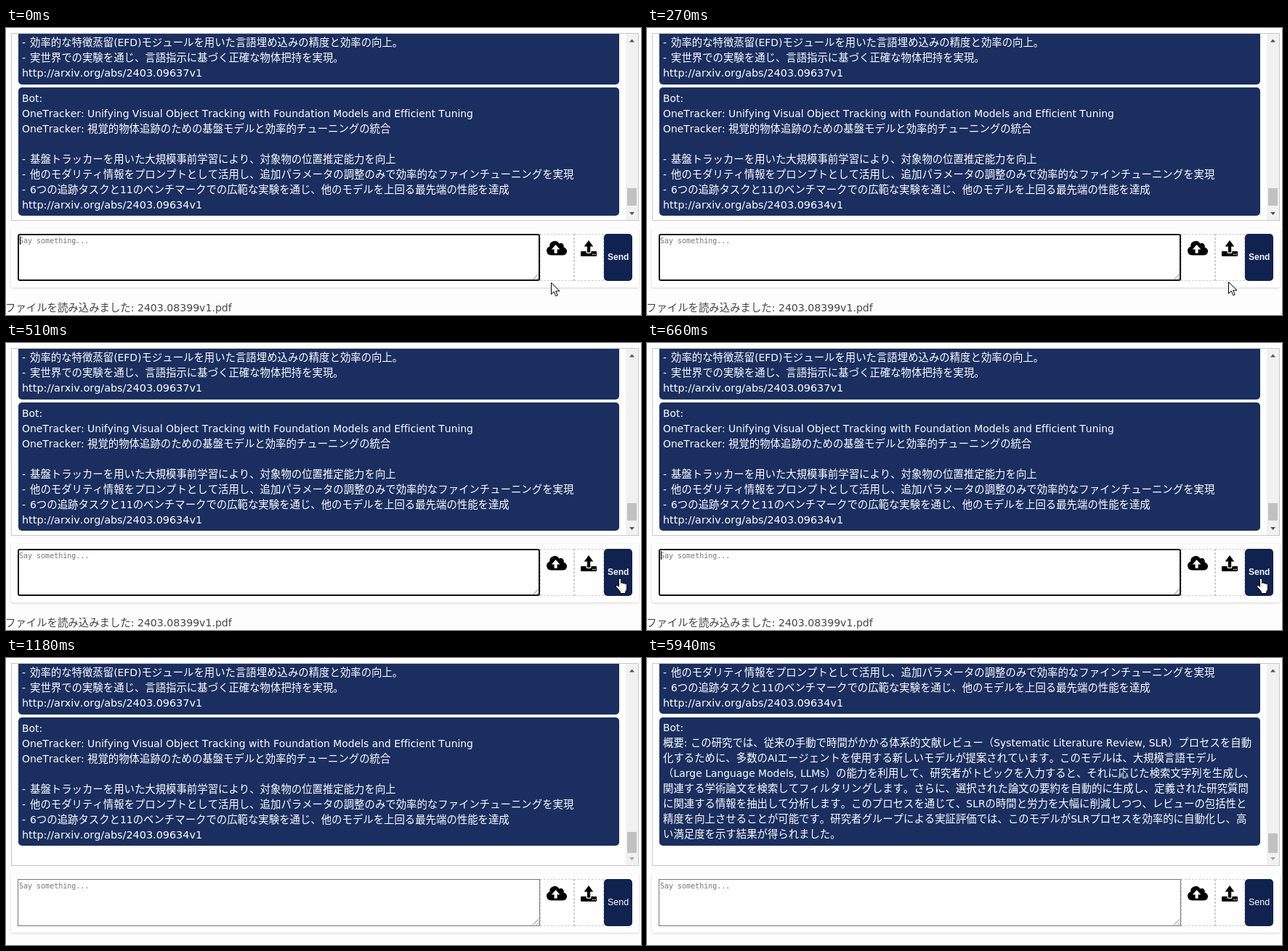
Animation, 874 px wide and 396 px high, one loop 8000 ms. Source, as an HTML page:

```html
<!DOCTYPE html>
<html lang="ja">
<head>
<meta charset="utf-8">
<title>Chat</title>
<style>
  html, body { margin: 0; width: 100%; height: 100%; overflow: hidden; background: #fdfdfd; }
  svg { display: block; width: 874px; height: 396px; }
  text {
    white-space: pre; font: 14.4px "Noto Sans CJK JP", "Noto Sans CJK", sans-serif;
    font-kerning: none; font-variant-ligatures: none; text-spacing-trim: space-all;
  }
  .word, .code { font-family: "DejaVu Sans", sans-serif; }
  .word { font-size: 13.9px; }
  .code { font-size: 14.4px; }
  #status { fill: #444; }
  #status .code { font-size: 14.1px; }
  .messages text { fill: #fff; font-weight: 500; }
  .messages rect { fill: #1a2f5f; }
  #hint { font: 10px "DejaVu Sans Mono", monospace; fill: #757575; }
  #send { font: bold 12px "Liberation Sans", Arial, sans-serif; fill: #f2f2f2; }
  .sent #send { font-weight: normal; font-size: 12.5px; fill: #fff; }
  #panel { fill: #fff; filter: drop-shadow(0 1px 1.5px rgba(0, 0, 0, .16)); }
  .drop { box-sizing: border-box; height: 65px; border: 1px dashed #ccc; }
  .pointer { fill: #fff; stroke: #000; stroke-linejoin: round; }
</style>
</head>
<body>
<svg viewBox="0 0 874 396">
  <clipPath id="view"><rect x="8" y="8" width="845" height="278"/></clipPath>
  <rect id="chat" x="7.5" y="7.5" width="863" fill="#fff" stroke="#c8c8c8"/>
  <g clip-path="url(#view)">
    <g id="before" class="messages"></g>
    <g id="after" class="messages"></g>
  </g>
  <rect id="track" x="853" y="8" width="17" fill="#f1f1f1"/>
  <path d="M858 19.5h7l-3.5-4z" fill="#505050"/>
  <rect id="thumb" x="855" width="13" fill="#c1c1c1"/>
  <path id="down" d="M858 -2h7l-3.5 4z"/>

  <g id="form">
    <rect id="panel" x="7" y="277" width="864" height="81" rx="2"/>
    <rect id="input" fill="#fff"/>
    <path d="M725 347.5l8-8M730 347.5l3-3" stroke="#777" fill="none"/>
    <text id="hint" x="18" y="297">Say something...</text>
    <path id="caret" d="M19.5 287v12" stroke="#000"/>
    <foreignObject x="735" y="284" width="47" height="65"><div class="drop"></div></foreignObject>
    <foreignObject x="782" y="284" width="41" height="65"><div class="drop"></div></foreignObject>
    <g transform="translate(744 294)">
      <path d="M6.3 19.6A6.3 6.3 0 0 1 4.2 7.4 7 7 0 0 1 17.3 3.5 4.2 4.2 0 0 1 23.5 8.5 5.6 5.6 0 0 1 22.4 19.6z"/>
      <path d="M12.6 5.2l5.3 6h-3.5v5.4h-3.6v-5.4H7.3z" fill="#fff" stroke="#fff" stroke-width=".4" stroke-linejoin="round"/>
    </g>
    <g transform="translate(791 293)">
      <rect y="15" width="22" height="7" rx="1.1"/>
      <rect x="7.6" y="13" width="6.8" height="5" rx="1.5" fill="#fff"/>
      <path d="M11 .3l5.8 7.9h-3.9v8.2H9.1V8.2H5.2z" stroke="#000" stroke-width=".5" stroke-linejoin="round"/>
      <path d="M16.2 19.6h1.5m1.4 0h1.5" stroke="#fff" stroke-width="1.5"/>
    </g>
    <rect x="823" y="284" width="39" height="65" rx="5" fill="#10224f"/>
    <text id="send" x="828" y="320">Send</text>
  </g>
  <text id="status" x="-1" y="391"></text>
  <path id="arrow" class="pointer" d="M.5 .5V16.5l3.8-3.7 2.5 6 2.4-1-2.5-5.8H12z"/>
  <path id="hand" class="pointer" d="M5.5 12V2.2a1.5 1.5 0 0 1 3 0V7.5c0-1.2 2.8-1.2 2.8.6 0-1.1 2.7-1 2.7.6 0-1 2.5-.8 2.5 1V15c0 2-1.8 3-1.8 5v1.5H7.5V20C7 17.5 3 14.5 1.5 12c-.6-1.2 1-2.2 2-1.2z"/>
</svg>
<script>
const LOOP = 8000, LINE = 21;
const $ = id => document.getElementById(id);
const set = (id, attrs) => {
  for (const name in attrs) $(id).setAttribute(name, attrs[name]);
};
const show = (id, visible) => { $(id).style.display = visible ? '' : 'none'; };

// Latin runs get their own face; long numbers mark links and file names.
const mixed = text => text.replace(/[ -~]+/g, run =>
  `<tspan class="${/\d{4}/.test(run) ? 'code' : 'word'}">${run}</tspan>`);

function line(text, y) {
  const bullet = text.startsWith('- ');
  const dash = bullet ? `<text x="22" y="${y}" class="word">-</text>` : '';
  return `${dash}<text x="${bullet ? 33 : 22}" y="${y}">${mixed(bullet ? text.slice(2) : text)}</text>`;
}
const lines = (list, y) => list.map((text, i) => line(text, y + i * LINE)).join('');
const bubble = (top, bottom) =>
  `<rect x="17" y="${top}" width="827" height="${bottom - top}" rx="5"/>`;

const grasping = [
  '- 効率的な特徴蒸留(EFD)モジュールを用いた言語埋め込みの精度と効率の向上。',
  '- 実世界での実験を通じ、言語指示に基づく正確な物体把持を実現。',
  'http://arxiv.org/abs/2403.09637v1'
];
const tracking = [
  'OneTracker: Unifying Visual Object Tracking with Foundation Models and Efficient Tuning',
  'OneTracker: 視覚的物体追跡のための基盤モデルと効率的チューニングの統合',
  '',
  '- 基盤トラッカーを用いた大規模事前学習により、対象物の位置推定能力を向上',
  '- 他のモダリティ情報をプロンプトとして活用し、追加パラメータの調整のみで効率的なファインチューニングを実現',
  '- 6つの追跡タスクと11のベンチマークでの広範な実験を通じ、他のモデルを上回る最先端の性能を達成',
  'http://arxiv.org/abs/2403.09634v1'
];
const summary = [
  '概要: この研究では、従来の手動で時間がかかる体系的文献レビュー（Systematic Literature Review, SLR）プロセスを自動',
  '化するために、多数のAIエージェントを使用する新しいモデルが提案されています。このモデルは、大規模言語モデル',
  '（Large Language Models, LLMs）の能力を利用して、研究者がトピックを入力すると、それに応じた検索文字列を生成し、',
  '関連する学術論文を検索してフィルタリングします。さらに、選択された論文の要約を自動的に生成し、定義された研究質問',
  'に関連する情報を抽出して分析します。このプロセスを通じて、SLRの時間と労力を大幅に削減しつつ、レビューの包括性と',
  '精度を向上させることが可能です。研究者グループによる実証評価では、このモデルがSLRプロセスを効率的に自動化し、高',
  'い満足度を示す結果が得られました。'
];
$('before').innerHTML = bubble(-20, 78) + lines(grasping, 25) +
  bubble(82, 259) + lines(['Bot:', ...tracking], 102);
$('after').innerHTML = bubble(-20, 77) + lines(tracking.slice(-3), 25) +
  bubble(82, 259) + lines(['Bot:', ...summary], 101);
$('status').innerHTML = mixed('ファイルを読み込みました: 2403.08399v1.pdf');

// Mouse steps: start time, pointer shape, position
const mouse = [
  [0, 'arrow', 750, 351],
  [120, 'arrow', 760, 364],
  [270, 'arrow', 800, 350],
  [390, 'hand', 826, 328],
  [510, 'hand', 838, 324],
  [1180, 'none', 0, 0]
];

function draw(t) {
  const sent = t >= 780, answered = t >= 5940;
  const bottom = sent ? 286 : 265;
  set('chat', { height: bottom - 7 });
  set('track', { height: bottom - 8 });
  const [top, end] = answered ? [242, 269] : sent ? [240, 269] : [221, 245];
  set('thumb', { y: top, height: end - top });
  set('down', { transform: `translate(0 ${bottom - 9})`, fill: sent ? '#a3a3a3' : '#505050' });
  show('before', !answered);
  show('after', answered);

  set('form', { class: sent ? 'sent' : '', transform: `translate(0 ${sent ? LINE : 0})` });
  const edge = sent ? 1 : 2;
  set('input', {
    x: 16 + edge / 2, y: 284 + edge / 2, width: 719 - edge, height: 65 - edge,
    rx: sent ? 0 : 2, stroke: sent ? '#767676' : '#101010', 'stroke-width': edge
  });
  show('caret', t < 270 || (t >= 660 && !sent));
  show('status', !sent);

  const [, shape, x, y] = mouse.findLast(step => step[0] <= t);
  for (const id of ['arrow', 'hand']) {
    show(id, id === shape);
    set(id, { transform: `translate(${x} ${y})` });
  }
}

function tick() {
  draw(performance.now() % LOOP);
  requestAnimationFrame(tick);
}
tick();
</script>
</body>
</html>
```
